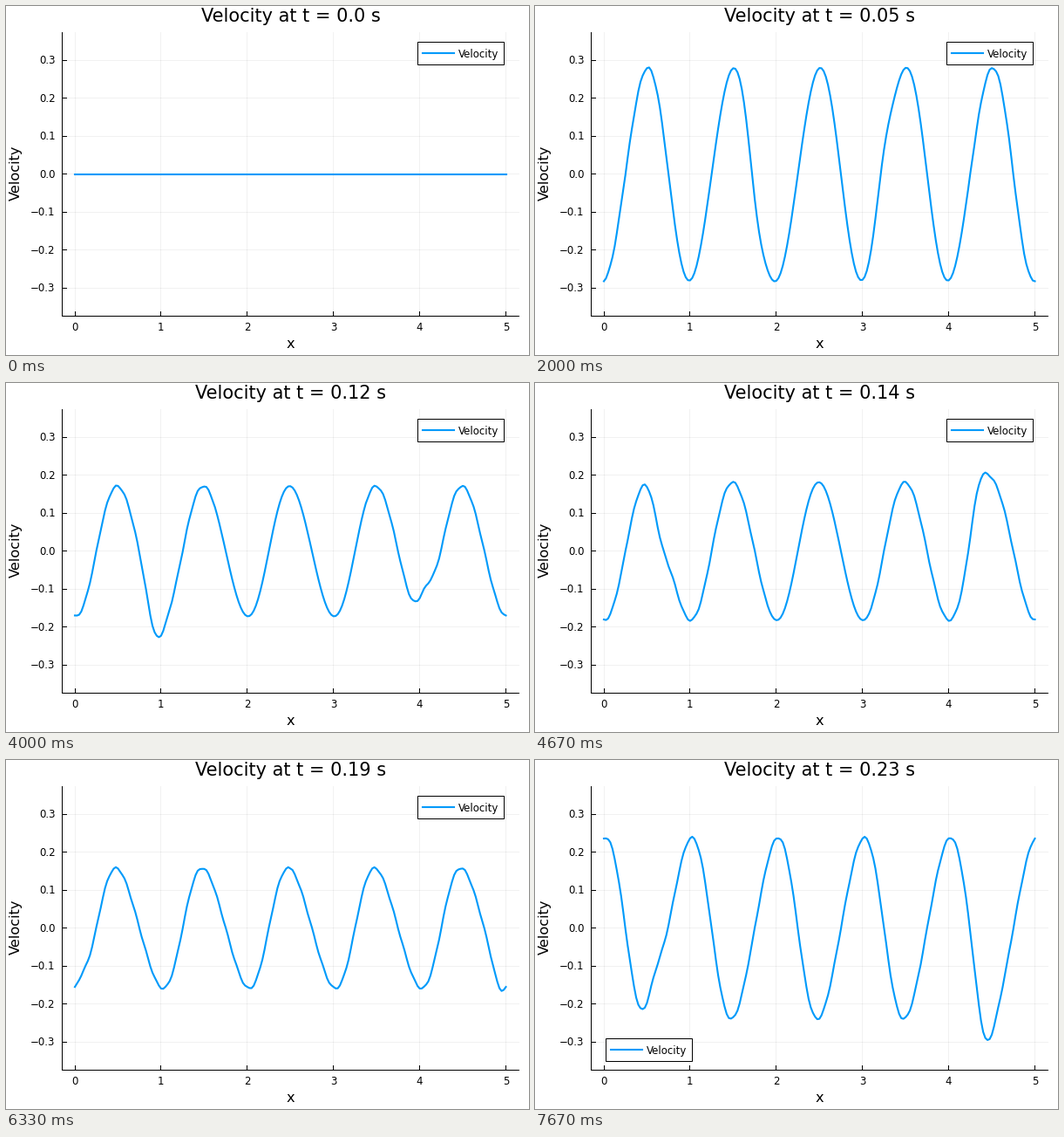
Animation, 600 px wide and 400 px high, one loop 8 s. Source, as a matplotlib script:

```python
import numpy as np
import matplotlib.pyplot as plt
from matplotlib.animation import FuncAnimation
from matplotlib.patches import Rectangle

W, H, DPI = 600, 400, 100
LOOP_MS, TICKS, STEPS = 8000, 320, 24
LEFT, RIGHT, TOP, BOTTOM = 64, 588.3, 30.3, 355
BLUE = "#009AFA"
LENGTH = 5.0
PT = 72 / DPI  # points per pixel

plt.rcParams["font.family"] = "DejaVu Sans"
fig = plt.figure(figsize=(W / DPI, H / DPI), dpi=DPI, facecolor="white")
ax = fig.add_axes([0, 0, 1, 1])
ax.set(xlim=(0, W), ylim=(H, 0))
ax.axis("off")


def px(x):
    return 79 + 98.9 * x


def py(v):
    return 192.8 - 435 * v


def line(xs, ys, width=1.0, color="black", **kw):
    return ax.plot(xs, ys, color=color, lw=width * PT, **kw)[0]


def label(x, y, text, size, ha="center", va="baseline", **kw):
    return ax.text(x, y, text, fontsize=size, ha=ha, va=va, **kw)


def draw_axes():
    for i in range(6):
        x = px(i) - 0.5
        line([x, x], [TOP, BOTTOM], alpha=0.055)
        line([x, x], [BOTTOM, BOTTOM - 5])
        label(px(i), 371.5, str(i), 8.5)
    for i in range(-3, 4):
        y = py(i / 10) - 0.5
        line([LEFT, RIGHT], [y, y], alpha=0.055)
        line([LEFT, LEFT + 5], [y, y])
        text = f"{i / 10:.1f}".replace("-", "\u2212")
        label(56.5, y + 4.3, text, 8.5, ha="right")
    line([LEFT, LEFT], [TOP, BOTTOM], solid_capstyle="projecting")
    line([LEFT, RIGHT], [BOTTOM, BOTTOM], solid_capstyle="projecting")
    label(326.3, 391.5, "x", 11.7)
    label(11.5, 191.3, "Velocity", 11.7, va="center", rotation=90)


draw_axes()
title = label(326.4, 18, "", 15)
x = np.linspace(0, LENGTH, 201)
curve = line(px(x), py(0 * x), 2.1, BLUE, zorder=3)

box = Rectangle((0, 0), 98.5, 26, fc="white", ec="black", lw=PT, zorder=4)
ax.add_patch(box)
key = line([0, 0], [0, 0], 2.1, BLUE, zorder=5)
key_text = label(0, 0, "Velocity", 8.5, ha="left", zorder=5)

BOTTOM_RIGHT = {2, 3, 9, 10, 16}
BOTTOM_LEFT = {17, 20, 23}


def place_legend(k):
    left = 81 if k in BOTTOM_LEFT else 472
    top = 318.6 if k in BOTTOM_LEFT | BOTTOM_RIGHT else 41
    box.set_xy((left, top))
    key.set_data([left + 6, left + 41.5], [top + 13.2, top + 13.2])
    key_text.set_position((left + 47, top + 18))


def pulse(center):
    """Periodic bell around center."""
    gap = (x - center + LENGTH / 2) % LENGTH - LENGTH / 2
    return 0.066 * np.exp(-0.5 * (gap / 0.085) ** 2)


def velocity(k):
    """Slowly steepening standing wave plus two pulses leaving the middle."""
    if k == 0:
        return 0 * x
    travel = 0.1414 * k - 0.092
    turn = 2 * np.pi * travel
    wave = 0.28 * np.sin(turn) * np.cos(2 * np.pi * x)
    steepening = -0.0125 * travel * np.cos(2 * turn) * np.sin(4 * np.pi * x)
    shift = 0.975 * travel
    pulses = pulse(2.5 + shift) - pulse(2.5 - shift)
    edge = np.minimum(x, LENGTH - x)
    ripple = 0.0022 * np.sin(2 * np.pi * (8.5 * edge - 3 * travel))
    return wave + steepening + pulses + ripple * (edge < travel)


def clock(k):
    hundredths = k if k >= 10 else max(k - 1, 0)
    return str(hundredths / 100)


def update(tick):
    k = (tick * STEPS + 16) // TICKS  # each step begins just before its third of a second
    title.set_text(f"Velocity at t = {clock(k)} s")
    curve.set_ydata(py(velocity(k)))
    place_legend(k)
    return title, curve, box, key, key_text


anim = FuncAnimation(fig, update, frames=TICKS, interval=LOOP_MS // TICKS,
                     init_func=lambda: update(0), repeat=True, repeat_delay=0)
plt.show()
```
